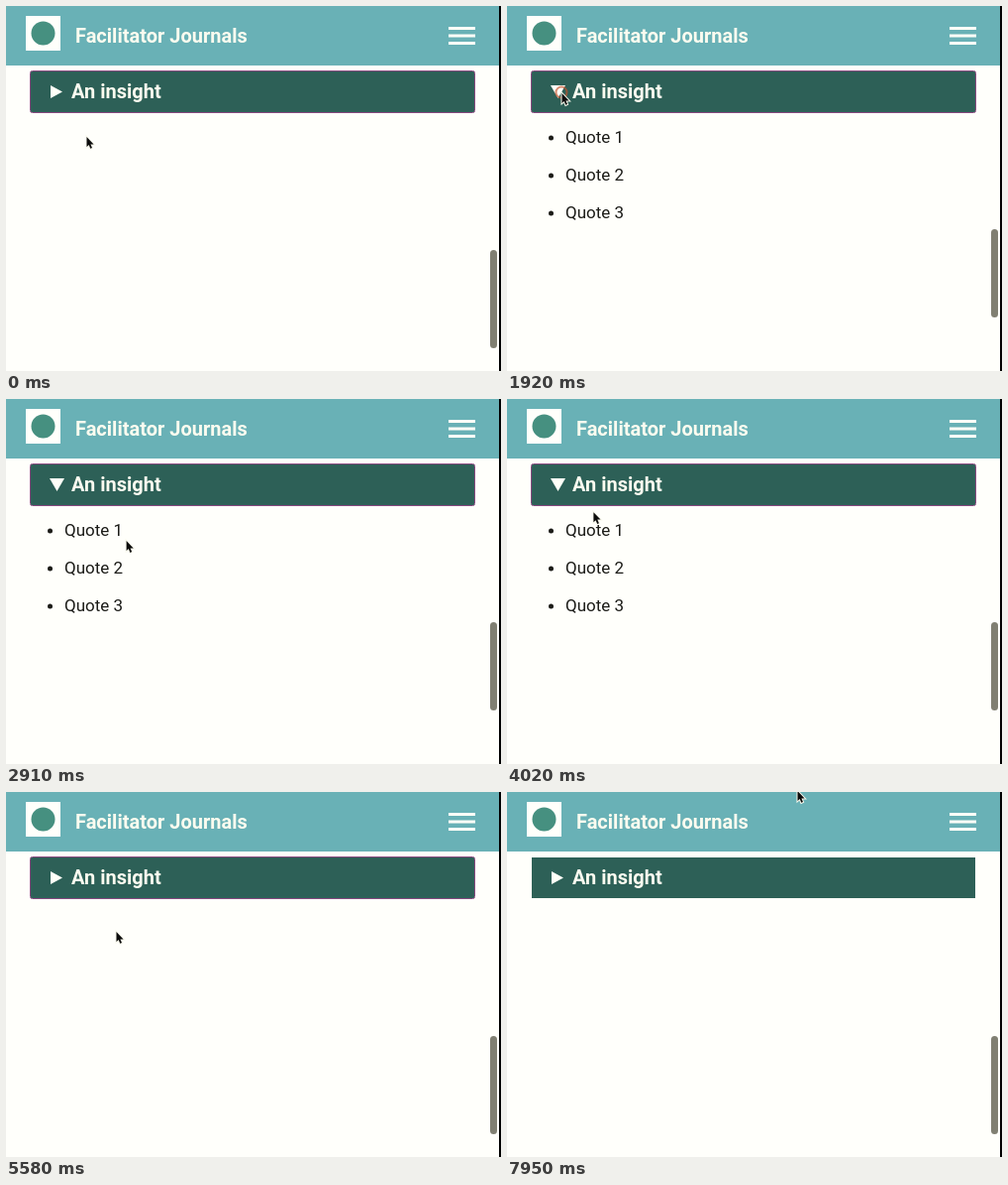
An HTML page for the animation above (8000 ms loop, 500x368 px).

```html
<!DOCTYPE html>
<html lang="en">
<head>
<meta charset="utf-8">
<title>Expandable insight</title>
<style>
  html, body { margin: 0; width: 100%; height: 100%; overflow: hidden; background: #fffffb; }
  svg { display: block; width: 500px; height: 368px; font-family: Roboto, sans-serif; }
  .heading { font-size: 20px; font-weight: 700; fill: #fcfcf0; }
  .quote { font-size: 17px; fill: #1c1c18; }
</style>
</head>
<body>
<svg viewBox="0 0 500 368">
  <rect width="500" height="368" fill="#fffffb"/>

  <rect width="498" height="60" fill="#69b1b6"/>
  <rect x="20" y="10" width="35" height="35" fill="#fffffb"/>
  <circle cx="37.5" cy="27.5" r="12" fill="#469080"/>
  <text class="heading" x="70" y="37">Facilitator Journals</text>
  <path d="M447 22.5h27M447 30h27M447 37.5h27" stroke="#fffff8" stroke-width="3"/>

  <rect x="25" y="66" width="448" height="41" fill="#2d6057"/>
  <rect id="focus" x="24.5" y="65.5" width="449" height="42" rx="2" fill="none" stroke="#87497f"/>
  <path id="marker" fill="#fffff8"/>
  <text class="heading" x="66" y="93">An insight</text>
  <g id="quotes"></g>

  <rect id="scrollbar" x="489" width="7" rx="3.5" fill="#807f72"/>
  <rect x="498" width="2" height="368" fill="#000"/>

  <circle id="ring" fill="none" stroke="#c4522c" stroke-width="2"/>
  <path id="cursor" d="M.5 1V11L2.7 9L4.3 12.8L6 12L4.4 8.4H7.6Z"
        fill="#0c0c0c" stroke="#f8f8ec" stroke-width="2" paint-order="stroke"/>
</svg>
<script>
const LOOP = 8000;
const OPEN_AT = 1790, CLOSE_AT = 4510, BLUR_AT = 7950;
const CLICKS = [1710, 4430], RING_TIME = 640;

// Cursor tip: time, x, y
const PATH = [
  [0, 81, 131], [430, 81, 131], [1160, 60, 96], [1240, 60, 96], [1540, 55, 87],
  [2540, 55, 87], [2910, 121, 142], [3110, 150, 160],
  [3540, 150, 160], [4310, 49, 85],
  [5290, 49, 85], [5580, 111, 140],
  [6410, 111, 140], [6710, 189, 72], [7080, 293, -2], [LOOP, 293, -2]
];

const el = id => document.getElementById(id);
const set = (id, attributes) => {
  for (const name in attributes) el(id).setAttribute(name, attributes[name]);
};

el('quotes').innerHTML = [1, 2, 3].map(n => {
  const y = 100 + 38 * n;
  return `<circle cx="44.5" cy="${y - 5}" r="2.5" fill="#1c1c18"/>
    <text class="quote" x="59" y="${y}">Quote ${n}</text>`;
}).join('');

function cursorAt(time) {
  const next = PATH.findIndex(point => point[0] > time);
  const [t0, x0, y0] = PATH[next - 1], [t1, x1, y1] = PATH[next];
  const p = (time - t0) / (t1 - t0);
  return [x0 + (x1 - x0) * p, y0 + (y1 - y0) * p];
}

function draw(now) {
  const time = now % LOOP;
  const open = time >= OPEN_AT && time < CLOSE_AT;
  const [x, y] = cursorAt(time);

  set('marker', { d: open ? 'M44 80H59L51.5 93Z' : 'M45 80V93L57 86.5Z' });
  set('quotes', { visibility: open ? 'visible' : 'hidden' });
  set('scrollbar', open ? { y: 225, height: 89 } : { y: 246, height: 99 });
  set('focus', { visibility: time < BLUR_AT ? 'visible' : 'hidden' });
  set('cursor', { transform: `translate(${x} ${y})` });

  const click = CLICKS.find(start => time >= start && time < start + RING_TIME);
  const age = click === undefined ? RING_TIME : time - click;
  set('ring', { cx: x, cy: y, r: 2 + age / 60, opacity: 1 - age / RING_TIME });
}

function frame() {
  draw(performance.now());
  requestAnimationFrame(frame);
}
frame();
</script>
</body>
</html>
```
